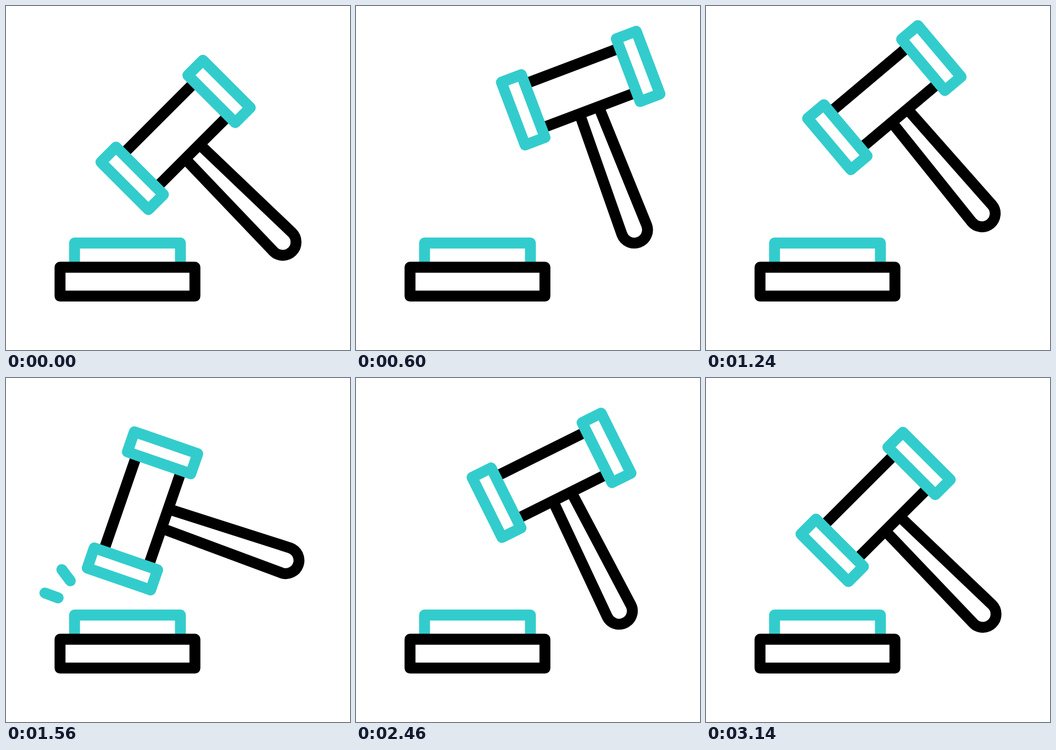
Animation of 640x640 px, one loop 3.6 s. Source, as an HTML page:

```html
<!DOCTYPE html>
<html lang="en">
<head>
<meta charset="utf-8">
<title>Gavel</title>
<style>
html, body { margin: 0; width: 100%; height: 100%; overflow: hidden; background: #fff; }
svg { display: block; width: 100%; height: 100%; }
g { fill: none; stroke: #000; stroke-width: 20.3; stroke-linejoin: round; }
.teal { stroke: #33cccc; }
.spark { stroke-linecap: round; }
</style>
</head>
<body>
<svg viewBox="0 0 640 640">
  <g>
    <path class="teal" d="M127.5 482V441H324.5V482"/>
    <rect x="100.5" y="486" width="251" height="53.7"/>
    <path class="teal spark"/>
    <path class="teal spark"/>
    <g id="gavel">
      <path d="M-95-44H95M-95 44H95"/>
      <path d="M-19 46L-24.6 282A24.6 24.6 0 0 0 24.6 282L19 46"/>
      <rect class="teal" x="-134.1" y="-62.4" width="39.6" height="124.8"/>
      <rect class="teal" x="94.5" y="-62.4" width="39.6" height="124.8"/>
    </g>
  </g>
</svg>
<script>
const LOOP = 3600;
const gavel = document.getElementById('gavel');
const sparks = document.querySelectorAll('.spark');

const clamp = u => Math.min(1, Math.max(0, u));
const lerp = (a, b, p) => a + (b - a) * p;
const smooth = u => u * u * (3 - 2 * u);
const easeOut = n => u => 1 - (1 - u) ** n;

// Bezier of any degree for one coordinate
const bezier = (pts, p) => pts.length < 2 ? pts[0]
  : bezier(pts.slice(1).map((b, i) => lerp(pts[i], b, p)), p);

// Swings of the gavel: time span, tilt, easing, path of the head centre
const swings = [
  { from: 0, to: 770, tilt: [45, 17.3], ease: smooth,
    x: [315.6, 372, 433], y: [239.8, 153.5, 150.8] },
  { from: 770, to: 1420, tilt: [17.3, 90], ease: u => u ** 3.6,
    x: [433, 289, 280, 226], y: [150.8, 137.2, 255, 299] },
  { from: 1420, to: 2300, tilt: [90, 24.5], ease: easeOut(1.97),
    x: [226, 240.5, 325, 377], y: [299, 234.8, 185, 174] },
  { from: 2300, to: 3140, tilt: [24.5, 45], ease: smooth,
    x: [377, 326, 332, 315.6], y: [174, 198, 225, 239.8] }
];

// Spark tracks, inner end to outer end
const tracks = [[130, 391, 102, 354], [113, 415, 69.5, 399]];

function draw(t) {
  const s = swings.find(s => t < s.to) || swings[3];
  const p = s.ease(clamp((t - s.from) / (s.to - s.from)));
  gavel.setAttribute('transform',
    `translate(${bezier(s.x, p)} ${bezier(s.y, p)}) rotate(${-lerp(...s.tilt, p)})`);

  const head = easeOut(2)(clamp((t - 1420) / 190));
  const tail = smooth(clamp((t - 1450) / 270));
  sparks.forEach((el, i) => {
    const [x0, y0, x1, y1] = tracks[i];
    const at = q => `${lerp(x0, x1, q)} ${lerp(y0, y1, q)}`;
    el.setAttribute('d', head > tail ? `M${at(tail)}L${at(head)}` : '');
  });
}

const start = performance.now();
function frame() {
  draw((performance.now() - start) % LOOP);
  requestAnimationFrame(frame);
}
frame();
</script>
</body>
</html>
```
